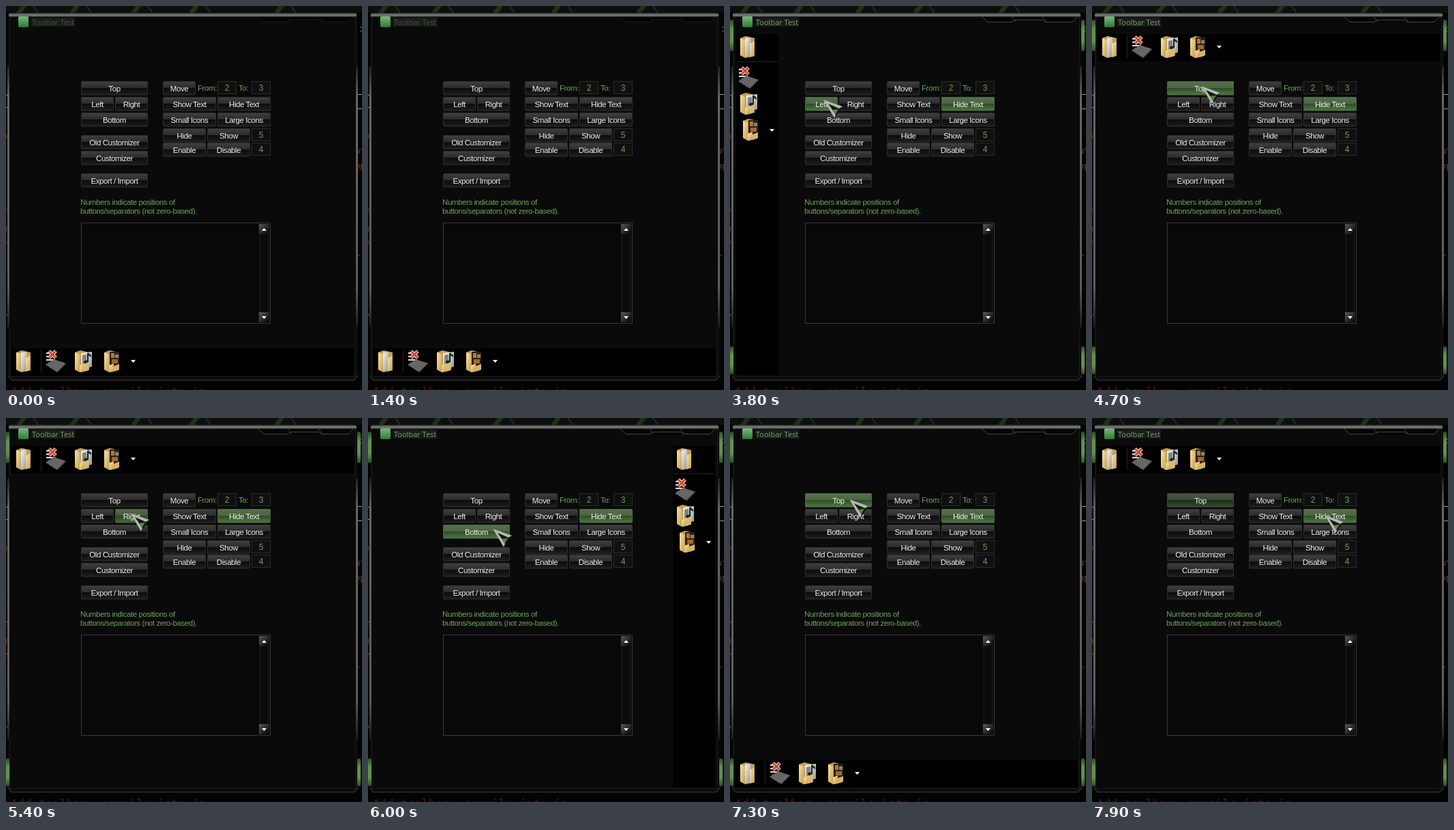
Recreate the animation shown at these times as an HTML page. Size 522 by 562 pixels, loop 8000 ms.

```html
<!DOCTYPE html>
<html lang="en">
<head>
<meta charset="utf-8">
<title>Toolbar Test</title>
<style>
html, body { margin: 0; width: 100%; height: 100%; overflow: hidden; background: #030303; }
svg { display: block; }
text { font: 11.5px "Liberation Sans", Arial, sans-serif; letter-spacing: -.42px; }
.cap { fill: #f2f2f2; text-anchor: middle; }
.lbl { fill: #67a551; }
.num { fill: #67a551; font-size: 12px; text-anchor: middle; }
.title { font: 11px "Open Sans", "Noto Sans", sans-serif; letter-spacing: 0; }
.code { font: 17px "DejaVu Sans Mono", monospace; letter-spacing: 0; fill: #6c0a0a; }
.bit { font: 12px "DejaVu Sans Mono", monospace; letter-spacing: 0; fill: #704018; }
</style>
</head>
<body>
<svg id="stage" width="522" height="562" viewBox="0 0 522 562">
<defs>
  <linearGradient id="dark" x2="0" y2="1">
    <stop offset="0" stop-color="#404040"/><stop offset=".5" stop-color="#2a2a2a"/>
    <stop offset=".5" stop-color="#0c0c0c"/><stop offset="1" stop-color="#1e1e1e"/>
  </linearGradient>
  <linearGradient id="green" x2="0" y2="1">
    <stop offset="0" stop-color="#56704c"/><stop offset=".5" stop-color="#4a6640"/>
    <stop offset=".5" stop-color="#304c28"/><stop offset="1" stop-color="#4f7842"/>
  </linearGradient>
  <linearGradient id="knob" x2="1" y2="1">
    <stop offset="0" stop-color="#5a5a5a"/><stop offset=".8" stop-color="#121212"/>
  </linearGradient>
  <linearGradient id="side" x2="0" y2="1">
    <stop offset="0" stop-color="#222"/><stop offset=".12" stop-color="#666"/>
    <stop offset=".85" stop-color="#5c5c5c"/><stop offset="1" stop-color="#1c1c1c"/>
  </linearGradient>
  <linearGradient id="bar" x2="0" y2="1">
    <stop offset="0" stop-color="#222"/><stop offset=".45" stop-color="#858585"/>
    <stop offset="1" stop-color="#141414"/>
  </linearGradient>
  <linearGradient id="glow" x2="0" y2="1">
    <stop offset="0" stop-color="#2a4a22"/><stop offset=".3" stop-color="#5c9448"/>
    <stop offset=".7" stop-color="#5c9448"/><stop offset="1" stop-color="#2a4a22"/>
  </linearGradient>
  <linearGradient id="app" x2="0" y2="1">
    <stop offset="0" stop-color="#7cb87a"/><stop offset="1" stop-color="#2d7a35"/>
  </linearGradient>
  <linearGradient id="cover" x2="1" y2="1">
    <stop offset="0" stop-color="#f8e7a8"/><stop offset="1" stop-color="#c99c48"/>
  </linearGradient>
  <linearGradient id="paper" x2="1" y2="1">
    <stop offset="0" stop-color="#f4f6f6"/><stop offset="1" stop-color="#8d979b"/>
  </linearGradient>
  <pattern id="check" width="2" height="2" patternUnits="userSpaceOnUse">
    <rect width="2" height="2" fill="#111"/>
    <path d="M0 0h1v1h-1zM1 1h1v1h-1z" fill="#bbb"/>
  </pattern>
</defs>
</svg>
<script>
const LOOP = 8000;
const stage = document.getElementById('stage');

const rect = (x, y, w, h, fill, more = '') =>
  `<rect x="${x}" y="${y}" width="${w}" height="${h}" fill="${fill}" ${more}/>`;
const path = (d, fill, more = '') => `<path d="${d}" fill="${fill}" ${more}/>`;
const line = (d, color, w = 1) => path(d, 'none', `stroke="${color}" stroke-width="${w}"`);
const text = (x, y, cls, s, more = '') => `<text x="${x}" y="${y}" class="${cls}" ${more}>${s}</text>`;
const group = (id, body, at) =>
  `<g${id ? ` id="${id}"` : ''}${at ? ` transform="translate(${at})"` : ''}>${body}</g>`;

// Desktop showing around the window
function desktop() {
  let s = rect(0, 0, 522, 562, '#030303') + rect(0, 0, 522, 10, '#0d0f0d');
  for (const x of [22, 100, 190, 275, 400])
    s += path(`M${x} 0h8l-7 10h-8z`, '#1e3119') + line(`M${x + 18} 0l7 10`, '#262926', 2);
  s += line('M0 130.5H6M0 148.5H6M515 150.5H522M515 129.5H522', '#999');
  const bits = [[-5, 194, 'n'], [-5, 303, 'e'], [-5, 350, 'e'], [-5, 330, 'u'],
    [512, 216, 'ut'], [512, 238, 'op'], [512, 371, 'r']];
  for (const [x, y, c] of bits) s += text(x, y, 'bit', c);
  s += line('M519 31h3M519 37h3M0 452h4', '#777');
  return s + text(7, 571, 'code', 'Add toolbar, compile into in');
}

function frame() {
  return path('M4 11H514L516 16V540L510 548H9L3 540V16Z', '#0a0a0a') +
    rect(4, 10, 510, 7, 'url(#bar)', 'rx="3"') +
    rect(8, 16, 503, 2, '#0a0a0a') +
    rect(2, 88, 3, 382, 'url(#side)') + rect(513, 88, 3, 382, 'url(#side)') +
    line('M5.5 16V88M512.5 16V88M5.5 470V541M512.5 470V541', '#1c1c1c') +
    line('M4 540.5L9 542.5H509L514 540.5', '#1c1c1c') +
    line('M3 541L8 547.5H510L516 541', '#262626', 2);
}

const tabs = (edge) =>
  path('M370 16L378 23.5H502L509 16Z', '#050505') +
  line('M370 16L378 23.5H413L418 20.5H458L463 23.5H502L509 16M413 16l6 7.5M458 16l6 7.5', edge);

function activeTrim() {
  const strips = (x) => rect(x, 20, 5, 46, 'url(#glow)', 'rx="2"') +
    rect(x, 498, 5, 41, 'url(#glow)', 'rx="2"');
  return tabs('#454545') + strips(0) + strips(515);
}

const caption = (color) => text(38, 28, 'title', 'Toolbar Test', `fill="${color}"`);

// x, y, width, label, id of the hover layer
const buttons = [
  [110, 110, 98, 'Top', 'top'], [110, 133, 48, 'Left', 'left'], [160, 133, 48, 'Right', 'right'],
  [110, 156, 98, 'Bottom', 'bottom'], [110, 189, 98, 'Old Customizer'],
  [110, 212, 98, 'Customizer'], [110, 245, 98, 'Export / Import'],
  [230, 110, 48, 'Move'], [230, 133, 78, 'Show Text'], [310, 133, 78, 'Hide Text', 'hideText'],
  [230, 156, 78, 'Small Icons'], [310, 156, 78, 'Large Icons'],
  [230, 179, 63, 'Hide'], [295, 179, 63, 'Show'], [230, 200, 63, 'Enable'], [295, 200, 63, 'Disable']
];

function button([x, y, w, label, id]) {
  const box = (fill, edge) => rect(x + .5, y + .5, w - 1, 19.5, fill, `stroke="${edge}" rx="1"`);
  return box('url(#dark)', '#2e2e2e') +
    (id ? group(id, box('url(#green)', '#48663c')) : '') +
    text(x + w / 2, y + 15, 'cap', label);
}

const field = (x, y, n) =>
  rect(x + .5, y + .5, 27, 18, '#101010', 'stroke="#2c2c2c"') + text(x + 14, y + 13.5, 'num', n);

function listBox() {
  const knob = (y, tri) => rect(371, y, 15, 15, 'url(#knob)') + path(tri, '#fff');
  return rect(110.5, 317.5, 277, 147, '#080808', 'stroke="#383838"') +
    rect(370, 319, 17, 144, '#0b0b0b') +
    line('M372.5 335V448M384.5 335V448', '#1b1b1b') +
    knob(319, 'M375 329h7l-3.5 -4z') + knob(448, 'M375 454h7l-3.5 4z');
}

const form = () => buttons.map(button).join('') +
  text(281, 124, 'lbl', 'From:') + text(341, 124, 'lbl', 'To:') +
  field(310, 110, 2) + field(360, 110, 3) + field(360, 179, 5) + field(360, 200, 4) +
  text(109, 291, 'lbl', 'Numbers indicate positions of') +
  text(109, 304, 'lbl', 'buttons/separators (not zero-based).') + listBox();

// Toolbar icons, each about 30 by 34
const folder = (inside) =>
  path('M1 4L9 1L22 4V30L9 33L1 29Z', '#c99f50') + inside +
  path('M1 4L8 7V33L1 29Z', 'url(#cover)');
const sheets = path('M8 4L16 3V29L8 32Z', 'url(#paper)') +
  path('M15 12L22 9V30L15 32Z', 'url(#cover)');
const music = path('M10 5L26 3V25L10 29Z', 'url(#paper)') +
  path('M12 8L18 7V18L12 22Z', '#7c868a') +
  line('M20 5V17', '#1d1d1d', 2) + path('M20 4l5 4v3l-5 -3z', '#2b2b2b') +
  '<ellipse cx="17.5" cy="18" rx="3.5" ry="2.5" fill="#222"/>' +
  path('M8 23L15 20V32L8 33Z', 'url(#cover)') + path('M15 21L23 17L20 30L15 32Z', '#d9bb70');
const picture = rect(9, 3, 14, 22, '#2a2018') + rect(11, 5, 5, 7, '#b8782c') +
  rect(17, 7, 5, 5, '#8a8378') + rect(12, 14, 9, 6, '#a06a2a') +
  path('M8 23L15 20V32L8 33Z', 'url(#cover)') + path('M15 24L23 21V29L15 32Z', '#d9b45c');
const broken = path('M2 3h13v14h-13z', '#0c0c0c') +
  line('M2 5h5M2 10h7M2 15h13', '#ddd', 2) +
  path('M1 22L13 14L31 20L18 33Z', 'url(#check)') +
  line('M6 2L16 12M16 2L6 12', '#eee', 5) + line('M6 2L16 12M16 2L6 12', '#e0421a', 3);
const arrow = path('M0 0h7l-3.5 4z', '#fff');

const rowBar = (id, y) => group(id,
  rect(7, -2, 503, 40, '#000') + line('M51.5 0V34', '#242424') +
  group('', folder(sheets), '14,0') + group('', broken, '57,0') +
  group('', folder(music), '100,0') + group('', folder(picture), '143,0') +
  group('', arrow, '183,15'), `0,${y}`);

const columnBar = (id, x) => group(id,
  rect(9, 41, 62, 499, '#000') + line('M10 81.5H70', '#242424') +
  group('', folder(sheets), '14,43') + group('', broken, '11,88') +
  group('', folder(music), '14,126') + group('', folder(picture), '18,164') +
  group('', arrow, '58,180'), `${x},0`);

const cursor = group('cursor',
  path('M-1 -1L27 9L15 26Z', '#151715') +
  path('M-1 -1L27 9L22 12L6 5L17 21L15 26Z', '#b4b8b2') +
  path('M12 14L21 13L16 21Z', '#4f8a3c'));

stage.insertAdjacentHTML('beforeend',
  desktop() + frame() + tabs('#191919') +
  rect(18, 15, 15, 16, 'url(#app)', 'rx="2"') + rect(37, 17, 64, 13, '#1a1b1a') +
  group('idle', caption('#3c5a35')) + group('active', activeTrim() + caption('#7c9f70')) +
  rowBar('barBottom', 503) + columnBar('barLeft', 0) + rowBar('barTop', 43) + columnBar('barRight', 438) +
  form() + cursor);

// Plays rows of [ms, value] over the loop, holding the ends
function play(id, rows, prop, easing) {
  const all = [[0, rows[0][1]], ...rows, [LOOP, rows[rows.length - 1][1]]];
  document.getElementById(id).animate(
    all.map(([t, v]) => ({ offset: t / LOOP, [prop]: v, easing })),
    { duration: LOOP, iterations: Infinity });
}

const fades = {
  bottom: [[2670, 0], [2960, 1], [3350, 1], [3650, 0], [5780, 0], [5950, 1], [6850, 1], [7150, 0]],
  left: [[3450, 0], [3720, 1], [4250, 1], [4520, 0]],
  top: [[4380, 0], [4620, 1], [5050, 1], [5300, 0], [6980, 0], [7220, 1], [7650, 1], [8000, .3]],
  right: [[5200, 0], [5430, 1], [5700, 1], [5930, 0]],
  hideText: [[3300, 0], [3500, 1]]
};
for (const id in fades) play(id, fades[id], 'opacity', 'linear');

const shows = {
  idle: [[0, 1], [3300, 0]],
  active: [[0, 0], [3300, 1]],
  barBottom: [[0, 1], [3700, 0], [6800, 1], [7500, 0]],
  barLeft: [[0, 0], [3700, 1], [4600, 0]],
  barTop: [[0, 0], [4600, 1], [5600, 0], [7500, 1]],
  barRight: [[0, 0], [5600, 1], [6800, 0]]
};
for (const id in shows) play(id, shows[id], 'opacity', 'step-end');

const moves = [
  [2350, 240, 575], [2780, 149, 162], [3350, 149, 162], [3700, 138, 138], [4200, 138, 138],
  [4600, 161, 118], [5050, 161, 118], [5400, 183, 140], [5700, 183, 140], [5950, 184, 163],
  [6850, 184, 163], [7250, 176, 120], [7600, 176, 120], [7880, 342, 143]
];
play('cursor', moves.map(([t, x, y]) => [t, `translate(${x}px, ${y}px)`]), 'transform', 'ease-in-out');
</script>
</body>
</html>
```
